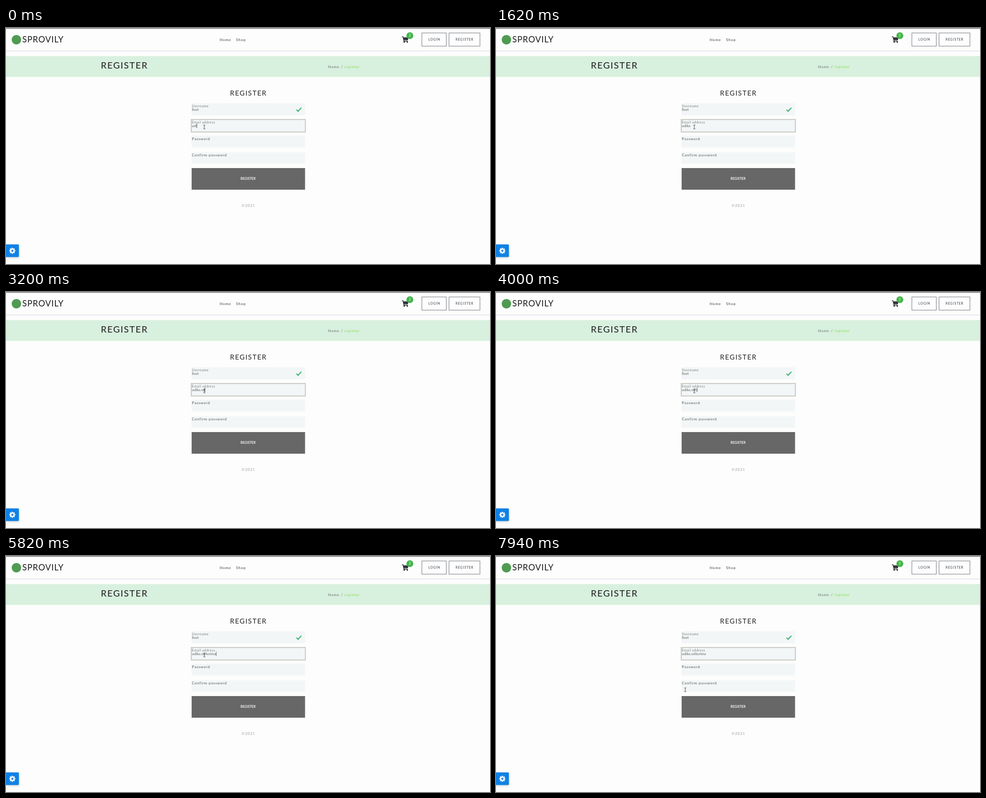
An HTML page that plays this animation: 1069x524 px, repeating every 8000 ms.

```html
<!DOCTYPE html>
<html lang="en">
<head>
<meta charset="utf-8">
<title>Register</title>
<style>
  html, body { margin: 0; width: 100%; height: 100%; overflow: hidden; background: #fcfdfc; }
  svg { display: block; width: 100%; height: 100%; }
  text { font-family: Lato, "Open Sans", sans-serif; font-size: 8px; white-space: pre; }
  .brand { font-size: 18.5px; letter-spacing: .95px; fill: #1c1c1c; }
  .nav { font-weight: 500; letter-spacing: .95px; fill: #484848; }
  .outline { font-size: 7px; letter-spacing: 1px; fill: #35353d; }
  .h1 { font-size: 20px; letter-spacing: 1.7px; fill: #1c1c1c; }
  .h2 { font-size: 15px; letter-spacing: 1.7px; fill: #222; }
  .crumb { letter-spacing: .85px; fill: #666; }
  .field { fill: #f3f6f7; }
  .label { font-size: 7.2px; letter-spacing: .65px; fill: #777; }
  .empty { font-weight: 500; letter-spacing: .82px; fill: #5c5c5c; }
  .value { fill: #606060; }
  .submit { font-size: 7px; font-weight: 700; letter-spacing: .15px; fill: #fff; }
  .foot { letter-spacing: .95px; fill: #999; }
  .badge { font-size: 7.5px; fill: #fff; text-anchor: middle; }
  #mouse { animation: mouse 8s infinite ease-in-out; }
  @keyframes mouse {
    0%, 74% { transform: translate(438px, 219.7px); }
    84%, 90% { transform: translate(437.6px, 262px); }
    97%, 100% { transform: translate(418px, 297px); }
  }
</style>
</head>
<body>
<svg viewBox="0 0 1069 524">
  <defs>
    <linearGradient id="shade" x2="0" y2="1">
      <stop stop-color="#dfe2ec"/>
      <stop offset="1" stop-color="#fcfdfc"/>
    </linearGradient>
    <filter id="soft" x="-50%" y="-50%" width="200%" height="200%">
      <feGaussianBlur stdDeviation="2"/>
    </filter>
  </defs>
  <rect width="1069" height="524" fill="#fcfdfc"/>

  <!-- header -->
  <rect y="50" width="1069" height="3" fill="url(#shade)"/>
  <rect width="1069" height="1" fill="#222"/>
  <circle cx="23" cy="26" r="10.5" fill="#4f9b52"/>
  <text class="brand" x="36" y="32.4">SPROVILY</text>
  <text class="nav" x="472" y="28.5">Home</text>
  <text class="nav" x="508.3" y="28.5">Shop</text>
  <g fill="#2f363b">
    <path d="M874.3 18.8h3.2l.6 2h11l-1.5 6.4h-8.2l.3 1.4h7.6v1.4h-9l-2.1-9.8h-1.9z"/>
    <circle cx="879.4" cy="31.2" r="1.6"/>
    <circle cx="886.3" cy="31.2" r="1.6"/>
  </g>
  <circle cx="892" cy="17" r="7.6" fill="#43b54a"/>
  <text class="badge" x="892" y="19.3">2</text>
  <g fill="none" stroke="#85858f" stroke-width="1.2">
    <rect x="918.5" y="11" width="54" height="29.3"/>
    <rect x="978.5" y="11" width="68.3" height="29.3"/>
  </g>
  <text class="outline" x="933" y="28">LOGIN</text>
  <text class="outline" x="993" y="28">REGISTER</text>

  <!-- banner -->
  <rect y="62.5" width="1069" height="46" fill="#d8f0de"/>
  <text class="h1" x="209.5" y="90.3">REGISTER</text>
  <text class="crumb" x="711.3" y="88.8">Home</text>
  <text class="crumb" x="740" y="88.8">/</text>
  <text class="crumb" x="747.7" y="88.8" style="fill:#86d94e">register</text>

  <!-- form -->
  <text class="h2" x="494.8" y="150.4">REGISTER</text>
  <rect class="field" x="410" y="167.2" width="250.5" height="26.5"/>
  <rect class="field" x="409.2" y="203.2" width="252" height="27.6" stroke="#c6c7bc" stroke-width="2"/>
  <rect class="field" x="410" y="239" width="250.5" height="26.5"/>
  <rect class="field" x="410" y="276" width="250.5" height="25"/>
  <text class="label" x="410.6" y="175.8">Username</text>
  <text class="value" x="410.5" y="184.3">Ilvet</text>
  <path d="M641.6 181.3l3.4 3.6 7.2-7.8" fill="none" stroke="#3fbc74" stroke-width="2.4"/>
  <text class="label" x="410.6" y="211.6">Email address</text>
  <text class="value" id="email" x="410.3" y="219.8"></text>
  <rect id="caret" y="212.4" width=".8" height="9.6" fill="#333"/>
  <text class="empty" x="410.6" y="248.6">Password</text>
  <text class="empty" x="410.6" y="285">Confirm password</text>
  <rect x="410" y="311" width="250.5" height="48" fill="#676767"/>
  <text class="submit" x="518" y="336.7">REGISTER</text>
  <text class="foot" x="520.6" y="396.6">©2021</text>

  <!-- settings tab -->
  <rect y="482" width="28.5" height="28" rx="2" fill="#8a9099" opacity=".45" filter="url(#soft)"/>
  <path d="M0 480.5h26.5a2 2 0 0 1 2 2v24a2 2 0 0 1-2 2H0z" fill="#0f82e6"/>
  <g transform="translate(14 494.6)" fill="none" stroke="#fff">
    <circle r="3.9" stroke-width="3"/>
    <circle r="5.9" stroke-width="2" pathLength="16" stroke-dasharray="1" stroke-dashoffset=".5"/>
  </g>

  <g id="mouse" fill="none" stroke="#333" stroke-width=".9">
    <path d="M-2.3-4.2h1.5Q0-4.2 0-3.4Q0-4.2.8-4.2h1.5M0-3.4v6.8M-2.3 4.2h1.5Q0 4.2 0 3.4Q0 4.2.8 4.2h1.5"/>
  </g>
</svg>
<script>
  const LOOP = 8000, BLINK = 500;
  const entry = "udiko.seltorima", typed = 3;
  // Press time of each character after the ones already typed
  const keys = [420, 780, 2000, 2700, 3100, 3500, 3860, 4220, 4600, 4850, 5100, 5350];
  const email = document.getElementById("email");
  const caret = document.getElementById("caret");
  const start = performance.now();

  function draw() {
    const t = (performance.now() - start) % LOOP;
    const pressed = keys.filter(k => k <= t);
    const last = pressed.length ? pressed[pressed.length - 1] : -60;
    const text = entry.slice(0, typed + pressed.length);
    if (email.textContent !== text) email.textContent = text;
    caret.setAttribute("x", 410.3 + email.getComputedTextLength());
    caret.style.opacity = (t - last) % (2 * BLINK) < BLINK ? 1 : 0;
    requestAnimationFrame(draw);
  }
  draw();
</script>
</body>
</html>
```
